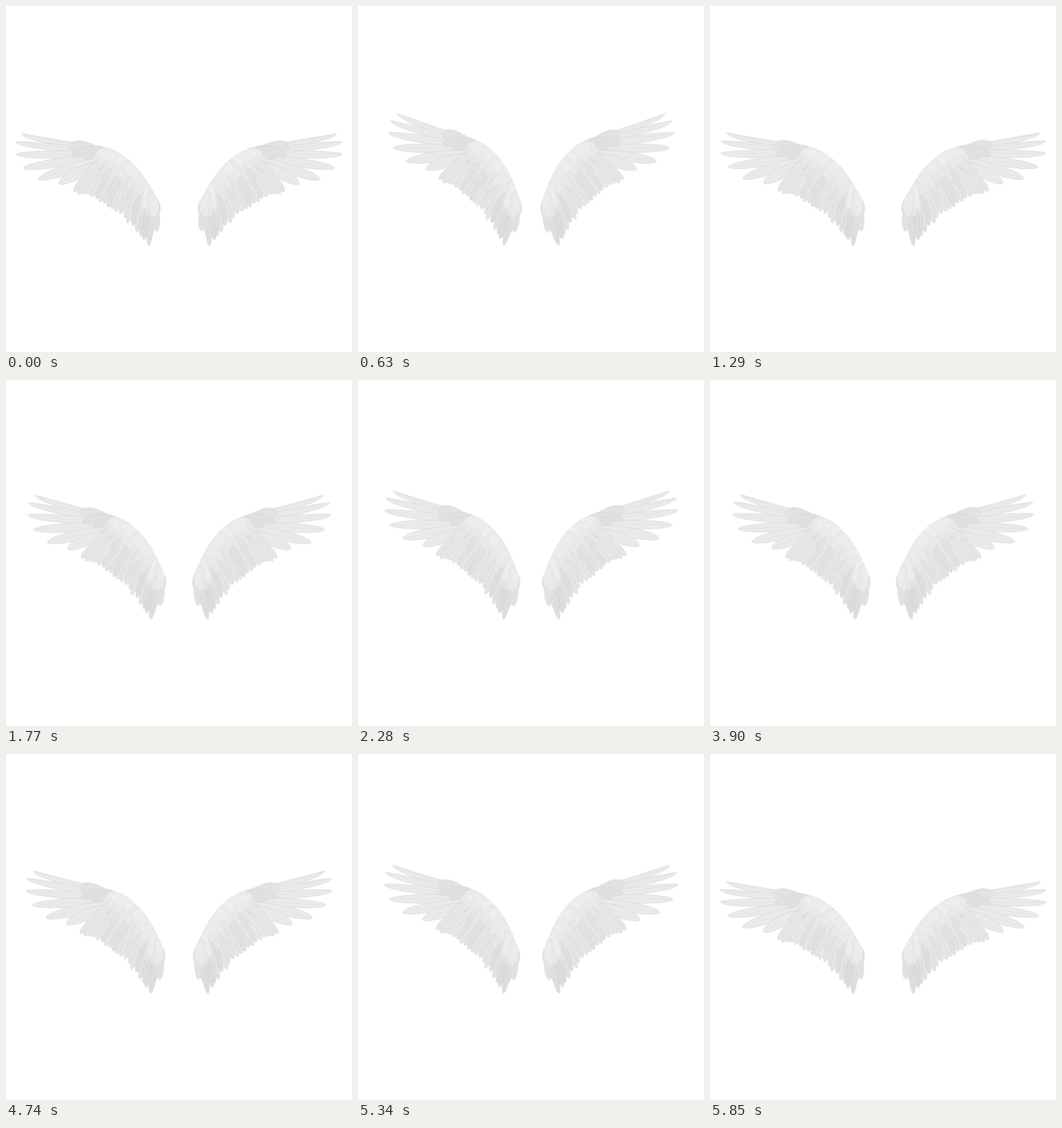
An HTML page that plays this animation: 480 by 480 pixels, repeating every 5880 ms.

```html
<!DOCTYPE html>
<html lang="en">
<head>
<meta charset="utf-8">
<title>Wings</title>
<style>
  html, body { margin: 0; width: 100%; height: 100%; overflow: hidden; background: #fff; }
  svg { display: block; width: 100%; height: 100%; }
  .wing {
    transform-origin: 204px 358px;
    animation: flap 5880ms cubic-bezier(.37, 0, .63, 1) infinite;
  }
  @keyframes flap {
    0%, 23.55%, 47.96%, 73.98%, 100% { transform: rotate(0deg); }
    11.05%, 35.29%, 60.88%, 87.07% { transform: rotate(9.6deg); }
  }
</style>
</head>
<body>
<svg viewBox="0 0 480 480">
  <g><g class="wing"></g></g>
  <g transform="translate(480.5 0) scale(-1 1)"><g class="wing"></g></g>
</svg>
<script>
  let seed = 11;
  const random = () => (seed = seed * 16807 % 2147483647) / 2147483647;
  const jitter = range => (random() - .5) * range;
  const mix = (a, b, t) => a + (b - a) * t;
  const grey = v => `rgb(${v},${v},${v})`;
  const polar = ([x, y], degrees, length) => {
    const a = degrees * Math.PI / 180;
    return [x + Math.cos(a) * length, y + Math.sin(a) * length];
  };
  const curve = (a, b, c) => t => [0, 1].map(k =>
    mix(mix(a[k], b[k], t), mix(b[k], c[k], t), t));

  const wrist = [130, 206];
  const arm = curve([118, 193], [175, 195], [206, 264]);      // leading edge
  const trail = curve([95, 258], [148, 268], [197, 331]);     // trailing tips

  function feather([x, y], [tipX, tipY], width, bend, shade, contrast = 14) {
    const dx = tipX - x, dy = tipY - y, length = Math.hypot(dx, dy);
    const at = (along, side) => [
      x + dx * along - dy / length * side,
      y + dy * along + dx / length * side
    ].map(v => v.toFixed(1)).join(" ");
    const h = width * .67, edge = grey(shade - contrast);
    const vane = `M${at(0, 0)}C${at(.25, h + bend)} ${at(.95, h + bend)} ${at(1, 0)}` +
      `C${at(.95, bend - h)} ${at(.25, bend - h)} ${at(0, 0)}Z`;
    const shaft = `M${at(0, 0)}Q${at(.6, bend)} ${at(.97, 0)}`;
    return `<path d="${vane}" fill="${grey(shade)}" stroke="${edge}" stroke-width=".7"/>` +
      `<path d="${shaft}" fill="none" stroke="${edge}" stroke-width=".5" opacity=".6"/>`;
  }

  // Long feathers fanning out from the wrist
  function primaries(count) {
    let out = "";
    for (let i = 0; i < count; i++) {
      const angle = 195 - 5.5 * i - .94 * i * i;
      const length = 112 + 9 * i - 3.5 * i * i;
      const root = [wrist[0] + 2 * i, wrist[1] - 11 + 4 * i];
      out += feather(root, polar(wrist, angle, length),
        mix(7, 15, i / (count - 1)), 1.5 * i - 5, 234, 20);
    }
    return out;
  }

  function secondaries(count) {
    let out = "";
    for (let i = 0; i < count; i++) {
      const t = i / (count - 1);
      const [x, y] = arm(mix(.3, .92, t));
      const [tipX, tipY] = trail(t);
      out += feather([x, y + 5], [tipX + jitter(2), tipY + jitter(5)],
        mix(13, 9, t), mix(2, -1, t), Math.round(mix(232, 224, t) + jitter(8)));
    }
    return out;
  }

  // Short feathers closing the wing towards the body
  function inner(count) {
    let out = "";
    for (let i = 0; i < count; i++) {
      const t = i / (count - 1);
      out += feather(arm(mix(.92, 1, t)), [mix(200, 211, t), mix(324, 288, t)], 8, -1, 225);
    }
    return out;
  }

  function coverts(count, from, to, length, width, shade) {
    let out = "";
    for (let i = 0; i < count; i++) {
      const t = mix(from, to, i / (count - 1));
      const angle = mix(174, 86, Math.pow(t, .8)) + jitter(22);
      out += feather(arm(t), polar(arm(t), angle, length * mix(.8, 1.2, random())),
        width, 0, Math.round(shade + jitter(8)), 8);
    }
    return out;
  }

  const art = primaries(6) + secondaries(19) + inner(5) +
    coverts(9, 0, .4, 36, 11, 226) +
    coverts(16, .3, 1, 44, 10, 229) +
    coverts(20, .25, 1, 28, 10, 234) +
    coverts(22, .22, 1, 16, 9, 237);

  document.querySelectorAll(".wing").forEach(wing => { wing.innerHTML = art; });
</script>
</body>
</html>
```
